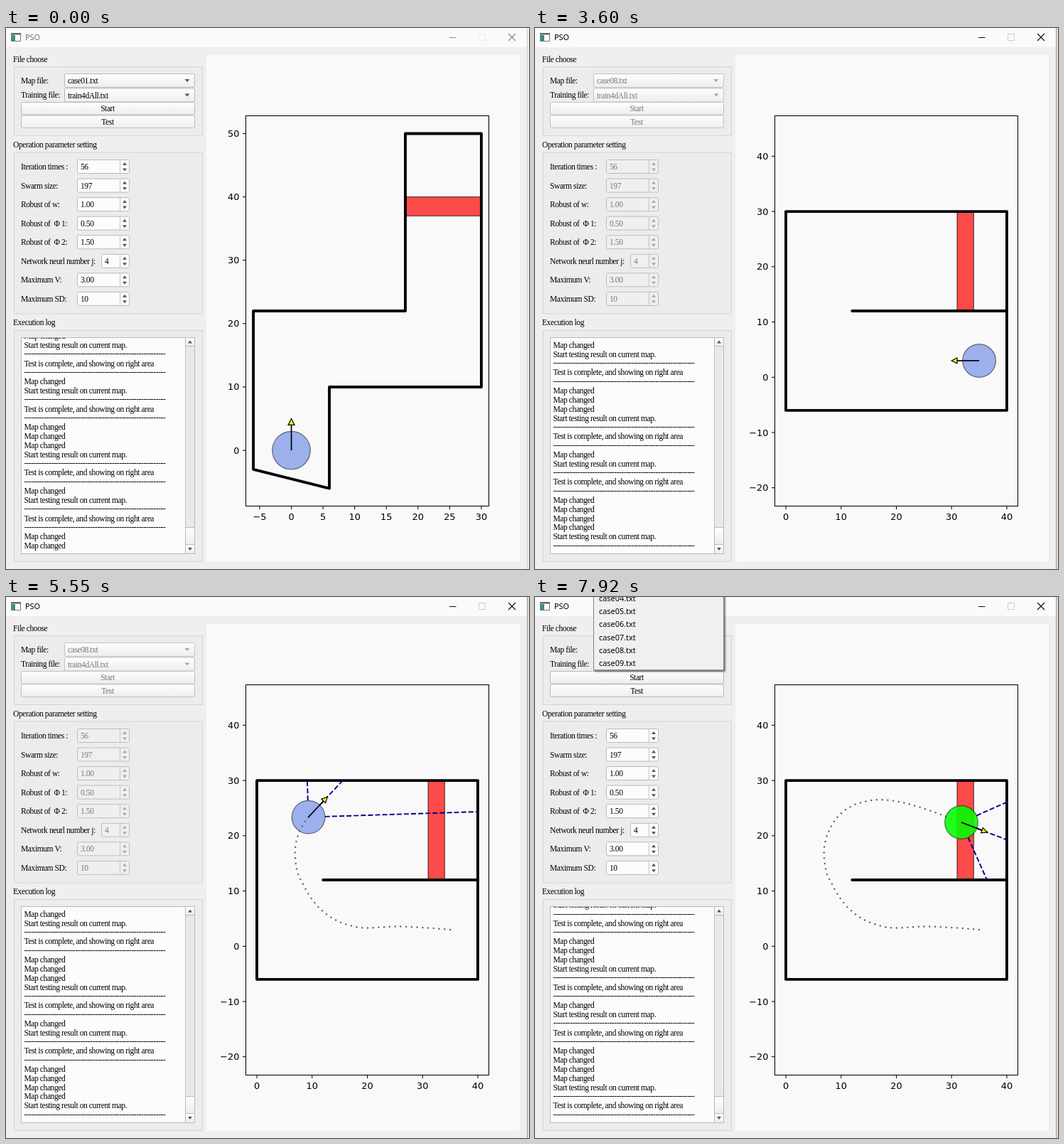
These frames come from a looping animation (736x761 px, 8000 ms). An HTML page:

```html
<!DOCTYPE html>
<html lang="en">
<head>
<meta charset="utf-8">
<title>PSO</title>
<style>
  html, body { margin: 0; width: 100%; height: 100%; overflow: hidden; background: #efefef; }
  svg { display: block; width: 100vw; height: 100vh; }
  text { font: 11.5px "Liberation Serif", serif; letter-spacing: -.4px; fill: #000; white-space: pre; }
  .sans { font: 10.9px "Noto Sans", sans-serif; letter-spacing: 0; }
  .tick { font: 12.9px "DejaVu Sans", sans-serif; letter-spacing: 0; }
  .mid { text-anchor: middle; }
  .end { text-anchor: end; }
  .off text { fill: #787878; }
  .group { fill: #ececec; stroke: #d4d4d4; }
  .field { fill: #fcfcfc; stroke: #b9b9b9; }
  .button { fill: url(#face); stroke: #b9b9b9; }
  .off .field { fill: #efefef; stroke: #bdbdbd; }
  .off .button { stroke: #c2c2c2; }
  .arrow { fill: #555; }
  .off .arrow { fill: #a8a8a8; }
  .rule { stroke: #c4c4c4; }
  .axis { fill: none; stroke: #000; stroke-width: 1.05; }
  .wall { fill: none; stroke: #000; stroke-width: 3.9; stroke-linejoin: round; stroke-linecap: round; }
  .goal { fill: #f00; fill-opacity: .7; stroke: #000; stroke-opacity: .75; }
  .car { stroke: #000; stroke-opacity: .5; stroke-width: 1.3; }
  .ray { stroke: #000080; stroke-width: 1.9; stroke-dasharray: 7 3.1; }
  .head { fill: #ff0; stroke: #000; stroke-width: 1.2; }
</style>
</head>
<body>
<svg viewBox="0 0 736 761" preserveAspectRatio="none">
  <defs>
    <linearGradient id="face" x2="0" y2="1">
      <stop stop-color="#fefefe"/><stop offset="1" stop-color="#ededed"/>
    </linearGradient>
    <clipPath id="logClip"><path d="M22 436H252V739H22Z"/></clipPath>
    <filter id="shadow" x="-10%" y="-10%" width="120%" height="120%">
      <feDropShadow dx="2" dy="2" stdDeviation="1" flood-opacity=".5"/>
    </filter>
  </defs>
  <path fill="#efefef" d="M0 0H736V761H0Z"/>
  <g id="frame"></g>
  <g id="labels"></g>
  <g id="controls"></g>
  <g id="log" clip-path="url(#logClip)"></g>
  <path fill="#f9f9f9" d="M282 38H723V751H282Z"/>
  <g id="plot"></g>
  <g id="menu"></g>
</svg>
<script>
const LOOP = 8000, TICK = 30, ROW = 18.35;
const layers = {};
const paint = (id, markup) => {
  if (layers[id] === markup) return;
  layers[id] = markup;
  document.getElementById(id).innerHTML = markup;
};
const label = (x, y, str, cls = '') => `<text x="${x}" y="${y}" class="${cls}">${str}</text>`;
const box = (x, y, w, h, cls, r = 0) =>
  `<rect x="${x}" y="${y}" width="${w}" height="${h}" rx="${r}" class="${cls}"/>`;
const line = (x1, y1, x2, y2, cls) => `<line x1="${x1}" y1="${y1}" x2="${x2}" y2="${y2}" class="${cls}"/>`;
const triangle = (x, y, dir, w = 3.5) =>
  `<path class="arrow" d="M${x - w} ${y - 2 * dir}h${2 * w}l${-w} ${4 * dir}z"/>`;
// Last entry of [time, value] pairs that has been reached.
const latest = (pairs, t) => pairs.reduce((v, p) => t >= p[0] ? p[1] : v, pairs[0][1]);

/* Window */

const params = [
  ['Iteration times :', 56], ['Swarm size:', 197], ['Robust of w:', '1.00'],
  ['Robust of  Φ 1:', '0.50'], ['Robust of  Φ 2:', '1.50'],
  ['Network neurl number j:', 4, 135], ['Maximum V:', '3.00'], ['Maximum SD:', 10]
];
const paramY = i => 195 + i * 26.55;

const drawFrame = active => {
  const ink = active ? '#111' : '#8a8a8a';
  return `<path fill="#fafafa" d="M0 0H733V27H0Z"/>
    <path fill="#fff" stroke="#777" d="M7.5 7.5h13v11h-13z"/>
    <path fill="#3f8d8a" d="M8 10h5v8h-5z"/><path fill="#666" d="M7 7h14v2.5h-14z"/>
    <g style="opacity:${active ? 1 : .55}">${label(27, 17.3, 'PSO', 'sans')}</g>
    <g fill="none" stroke="${ink}"><path d="M624 13.5h9.5"/>
    <path stroke="${active ? '#cdcdcd' : '#ebebeb'}" d="M665.5 8.5h9v9h-9z"/>
    <path stroke-width="1.2" d="M707 8l10 10M717 8l-10 10"/></g>
    <path fill="${active ? '#ead8cb' : '#f3f1ef'}" d="M734 0h2v761h-2z"/>
    <path stroke="${active ? '#a3988f' : '#c9c9c9'}" d="M733.5 0v761"/>`;
};

const drawLabels = () =>
  box(11.5, 54.5, 265, 97, 'group') + box(11.5, 175, 265, 227, 'group') + box(11.5, 425.5, 265, 325, 'group') +
  label(10, 48, 'File choose') + label(10, 168, 'Operation parameter setting') + label(10, 418, 'Execution log') +
  label(21, 78, 'Map file:') + label(21, 98, 'Training file:') +
  params.map(([name], i) => label(21, paramY(i) + 4, name)).join('') +
  box(21.5, 435.5, 244, 304, 'field') +
  `<path fill="#e9e9e9" d="M252 436h13v303h-13z"/>` + line(252.5, 436, 252.5, 739, 'rule') +
  box(252.5, 435.5, 13, 12, 'button') + box(252.5, 702.5, 13, 24, 'button') + box(252.5, 726.5, 13, 13, 'button') +
  triangle(259, 441.5, -1, 3) + triangle(259, 733, 1, 3);

const combo = (y, str) => box(82.5, y - 9.5, 183, 19, 'button', 2) + label(87, y + 4, str) + triangle(255, y, 1);
const button = (y, str) => box(21.5, y - 9, 244, 17.5, 'button', 2) + label(143, y + 3.5, str, 'mid');
const spin = (y, value, x = 101) =>
  box(x - .5, y - 9.5, 174 - x, 19, 'field', 2) + line(160.5, y - 9, 160.5, y + 9, 'rule') +
  label(x + 4, y + 4, value) + triangle(167, y - 4, -1, 3) + triangle(167, y + 4.5, 1, 3);

const drawControls = (file, busy) => `<g class="${busy ? 'off' : ''}">` +
  combo(74, `case0${file}.txt`) + combo(94.5, 'train4dAll.txt') + button(113.5, 'Start') + button(132, 'Test') +
  params.map(([, value, x], i) => spin(paramY(i), value, x)).join('') + '</g>';

const messages = {
  M: 'Map changed', S: 'Start testing result on current map.',
  T: 'Test is complete, and showing on right area', D: '-'.repeat(58)
};
const history = 'MSDTD' + 'MSDTD' + 'MMMSDTD' + 'MSDTD' + 'MMMMSDTD';
const drawLog = count => [...history.slice(0, count)].slice(-24).map((key, i) => {
  const baseline = 732 - 12.82 * (23 - i) - (key === 'D' ? 1.5 : 0);
  return label(25.5, baseline.toFixed(1), messages[key]);
}).join('');

/* Drop-down list: opened, closed, selected file, [time, highlighted row] */

const menus = [
  [810, 1380, 1, [[810, 1], [990, 2], [1020, 3], [1050, 4], [1080, 5], [1110, 6], [1140, 7]]],
  [1860, 2730, 7, [[1860, 7], [2010, 8], [2040, 9], [2460, 8]]],
  [7560, LOOP, 8, [[7560, 8], [7830, 7], [7860, 5], [7890, 4], [7920, 0]]]
];
const drawMenu = t => {
  const menu = menus.find(([from, to]) => t >= from && t < to);
  if (!menu) return '';
  const hot = latest(menu[3], t), top = 65.5 - (menu[2] - 1) * ROW;
  let out = `<rect x="82.5" y="${top - 1}" width="183" height="${9 * ROW + 1.5}" fill="#f0f0f0" stroke="#808080" filter="url(#shadow)"/>`;
  for (let i = 1; i <= 9; i++) {
    const y = top + (i - 1) * ROW;
    if (i === hot) out += `<rect x="83" y="${y}" width="182" height="${ROW}" fill="#3399ff"/>`;
    out += `<g style="${i === hot ? 'filter:invert(1)' : ''}">${label(90, y + 13.5, `case0${i}.txt`, 'sans')}</g>`;
  }
  return out;
};

/* Plot: centre of the view, pixels per unit, tick ranges, walls, goal, car pose */

const maps = {
  1: {
    center: [12, 22], unit: 8.912, xTicks: [-5, 30, 5], yTicks: [0, 50, 10],
    walls: [[[-6, -3], [-6, 22], [18, 22], [18, 50], [30, 50], [30, 10], [6, 10], [6, -6], [-6, -3]]],
    goal: [18, 40, 12, 3], car: [0, 0, 90]
  },
  7: {
    center: [0, 35], unit: 3.839, xTicks: [-40, 40, 20], yTicks: [-20, 100, 20],
    walls: [[[-30, -30], [-30, 40], [-6, 60], [-6, 100], [6, 100], [6, 60], [30, 40], [30, -30], [-30, -30]]],
    goal: [-6, 75, 12, 3], car: [0, 0, -90]
  },
  8: {
    center: [20, 12], unit: 7.773, xTicks: [0, 40, 10], yTicks: [-20, 40, 10],
    walls: [[[0, -6], [0, 30], [40, 30], [40, -6], [0, -6]], [[12, 12], [40, 12]]],
    goal: [31, 30, 3, 18], car: [35, 3, 180]
  }
};
const project = ({ center, unit }, [x, y]) => [508.5 + (x - center[0]) * unit, 398 - (y - center[1]) * unit];
const pixelWalls = map => map.walls.map(wall => wall.map(p => project(map, p)));
const range = ([from, to, step]) => Array.from({ length: (to - from) / step + 1 }, (_, i) => from + i * step);
const number = n => String(n).replace('-', '−');

const drawMap = map => {
  const [gx, gy, gw, gh] = map.goal, [px, py] = project(map, [gx, gy]);
  return range(map.xTicks).map(n => {
    const [x] = project(map, [n, 0]);
    return line(x, 672.5, x, 677, 'axis') + label(x, 691.5, number(n), 'tick mid');
  }).join('') + range(map.yTicks).map(n => {
    const [, y] = project(map, [0, n]);
    return line(333, y, 337.5, y, 'axis') + label(328.5, y + 4.5, number(n), 'tick end');
  }).join('') + box(px, py, gw * map.unit, gh * map.unit, 'goal') +
    box(337.5, 123.5, 342, 549, 'axis') +
    pixelWalls(map).map(wall => `<polyline class="wall" points="${wall.join(' ')}"/>`).join('');
};

/* The test drive: smooth track through a few points, equal steps along it */

const STEPS = 67;
const track = document.createElementNS('http://www.w3.org/2000/svg', 'path');
const via = [
  [625, 468], [586, 465], [548, 463.4], [509, 465.5], [486, 462.5], [462, 453.5], [442, 438.5],
  [427, 420], [416.5, 401], [411, 390], [407, 368], [408, 346], [416, 324], [429, 306], [448, 293],
  [471, 286.5], [488, 285.3], [504, 286.8], [523, 290.3], [546, 297.2], [573, 306.7], [600, 317]
];
const knot = i => via[Math.max(0, Math.min(via.length - 1, i))];
const handle = (i, sign) => knot(i).map((v, k) => v + sign * (knot(i + 1)[k] - knot(i - 1)[k]) / 6);
track.setAttribute('d', `M${via[0]}` +
  via.slice(1).map((p, i) => `C${handle(i, 1)} ${handle(i + 1, -1)} ${p}`).join(''));
const stride = track.getTotalLength() / STEPS;
const at = s => track.getPointAtLength(Math.max(0, Math.min(STEPS, s)) * stride);

const pace = [[3510, 1], [4320, 19], [5070, 36], [5130, 38], [5970, 56], [6060, 58.4], [6630, 71]];
const stepAt = t => {
  if (t < pace[0][0]) return -1;
  const i = pace.findIndex(p => p[0] > t);
  if (i < 0) return STEPS;
  const [t0, s0] = pace[i - 1], [t1, s1] = pace[i];
  return Math.max(-1, Math.floor(s0 + (s1 - s0) * (t - t0) / (t1 - t0) + 1e-6) - 4);
};

// Distance from (x, y) along direction (dx, dy) to the nearest wall.
const distance = (walls, x, y, dx, dy) => {
  let best = 1e4;
  for (const wall of walls) for (let i = 1; i < wall.length; i++) {
    const [ax, ay] = wall[i - 1], ex = wall[i][0] - ax, ey = wall[i][1] - ay;
    const det = dx * ey - dy * ex;
    if (Math.abs(det) < 1e-9) continue;
    const d = ((ax - x) * ey - (ay - y) * ex) / det;
    const f = ((ax - x) * dy - (ay - y) * dx) / det;
    if (d > 0 && f >= 0 && f <= 1) best = Math.min(best, d);
  }
  return best;
};

const drawCar = (map, x, y, angle, done) => {
  const u = map.unit;
  return `<circle class="car" cx="${x}" cy="${y}" r="${3 * u}" fill="${done ? '#0f0' : '#4169e1'}" fill-opacity="${done ? .88 : .5}"/>
    <g transform="translate(${x} ${y}) rotate(${angle})">
    <path stroke="#000" stroke-width="1.7" d="M0 0H${4 * u}"/>
    <path class="head" d="M${4 * u} ${-u / 2}V${u / 2}L${5 * u} 0Z"/></g>`;
};

const drawDrive = (map, step, done) => {
  if (step < 0) {
    const [cx, cy, deg] = map.car;
    return drawCar(map, ...project(map, [cx, cy]), -deg, false);
  }
  const { x, y } = at(step), back = at(step - .2), ahead = at(step + .8);
  const angle = Math.atan2(ahead.y - back.y, ahead.x - back.x);
  const walls = pixelWalls(map), radius = 3 * map.unit;
  const rays = [-1, 0, 1].map(side => {
    const dx = Math.cos(angle + side * Math.PI / 4), dy = Math.sin(angle + side * Math.PI / 4);
    const d = distance(walls, x, y, dx, dy);
    return d > radius ? line(x + dx * radius, y + dy * radius, x + dx * d, y + dy * d, 'ray') : '';
  }).join('');
  let dots = '';
  for (let s = 0; s <= step; s++) {
    const p = at(s);
    dots += `<circle cx="${p.x}" cy="${p.y}" r="1.25" fill="#686868"/>`;
  }
  const car = drawCar(map, x, y, angle * 180 / Math.PI, done);
  return rays + (done ? dots + car : car.replace('<g', dots + '<g'));
};

const render = t => {
  const step = stepAt(t), done = t >= 6630;
  const map = maps[latest([[0, 1], [1410, 7], [2760, 8]], t)];
  paint('frame', drawFrame(t >= 810));
  paint('controls', drawControls(latest([[0, 1], [1380, 7], [2730, 8]], t), t >= 3510 && !done));
  paint('log', drawLog(latest([[0, 24], [1410, 25], [2760, 26], [3510, 28], [6630, 30]], t)));
  paint('plot', drawMap(map) + drawDrive(map, step, done));
  paint('menu', drawMenu(t));
};

paint('labels', drawLabels());
const start = performance.now();
const loop = () => {
  const t = (performance.now() - start) % LOOP;
  render(Math.floor(t / TICK) * TICK);
  requestAnimationFrame(loop);
};
loop();
</script>
</body>
</html>
```
